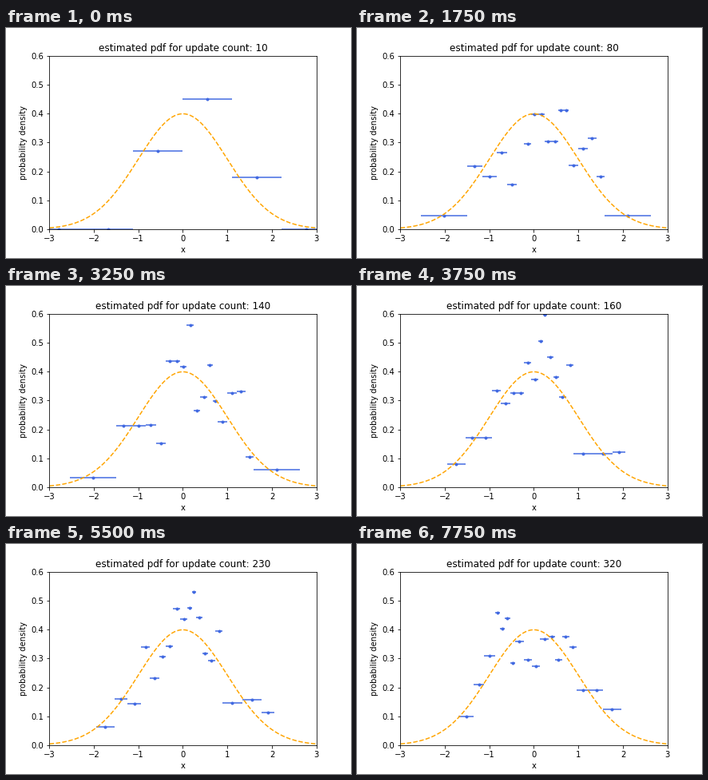
Animation, 432 px wide and 288 px high, one loop 8 s. Source, as a matplotlib script:

```python
import numpy as np
import matplotlib.pyplot as plt
from matplotlib.animation import FuncAnimation
from matplotlib.collections import LineCollection

STEP = 10        # updates per frame
FRAMES = 32
BINS = 18
MEMORY = 100     # most weight that past samples keep after a rebinning
BLUE = "royalblue"

plt.rcParams.update({
    "font.family": "DejaVu Sans",
    "font.size": 10,
    "figure.subplot.bottom": 0.125,
})

samples = np.random.default_rng(4).standard_normal(STEP * FRAMES)


class Histogram:
    """Bins that start with given masses and then collect samples."""

    def __init__(self, start, edges, mass):
        self.start, self.edges, self.mass = start, edges, mass
        self.mid = (edges[1:] + edges[:-1]) / 2

    def density(self, n):
        hits, _ = np.histogram(samples[self.start:n], self.edges)
        weight = min(self.start, MEMORY) + n - self.start
        return (self.mass + hits) / (weight * np.diff(self.edges))


def rebinned(start, knots):
    """Bins of equal mass, lighter at both ends; inner knots span two bins."""
    index = [0, *range(1, BINS, 2), BINS]
    edges = np.interp(np.arange(BINS + 1), index, knots)
    mass = np.full(BINS, min(start, MEMORY) / BINS)
    mass[[0, -1]] *= 2 / 3
    return Histogram(start, edges, mass)


stages = [
    Histogram(10, np.arange(-3, 4) * 20 / BINS, np.array([0, 0, 3, 5, 2, 0])),
    rebinned(50, [-2.54, -1.49, -.83, -.38, -.06, .24,
                  .55, .78, 1.21, 1.59, 2.63]),
    rebinned(150, [-1.945, -1.53, -.94, -.53, -.22, .10,
                   .30, .565, .89, 1.77, 2.05]),
    rebinned(250, [-1.69, -1.35, -.87, -.65, -.42, -.04,
                   .33, .63, .96, 1.55, 1.965]),
]

fig, ax = plt.subplots(figsize=(6, 4), dpi=72)
bars = LineCollection([], colors=BLUE, linewidths=1.5, zorder=2)
ax.add_collection(bars)
dots, = ax.plot([], [], ".", color=BLUE, markersize=6)
xs = np.linspace(-10, 10, 500)
ax.plot(xs, np.exp(-xs ** 2 / 2) / np.sqrt(2 * np.pi), "--",
        color="orange", linewidth=1.5)
ax.set_xlim(-3, 3)
ax.set_ylim(0, 0.6)
ax.set_xlabel("x")
ax.set_ylabel("probability density")
title = ax.set_title("")


def update(i):
    n = STEP * (i + 1)
    hist = [s for s in stages if s.start <= n][-1]
    y = hist.density(n)
    spans = zip(hist.edges[:-1], hist.edges[1:], y)
    bars.set_segments([[(a, v), (b, v)] for a, b, v in spans])
    dots.set_data(hist.mid, y)
    title.set_text(f"estimated pdf for update count: {n}")
    return bars, dots, title


anim = FuncAnimation(fig, update, frames=FRAMES, interval=250,
                     repeat=True, repeat_delay=0, blit=False)
plt.show()
```
